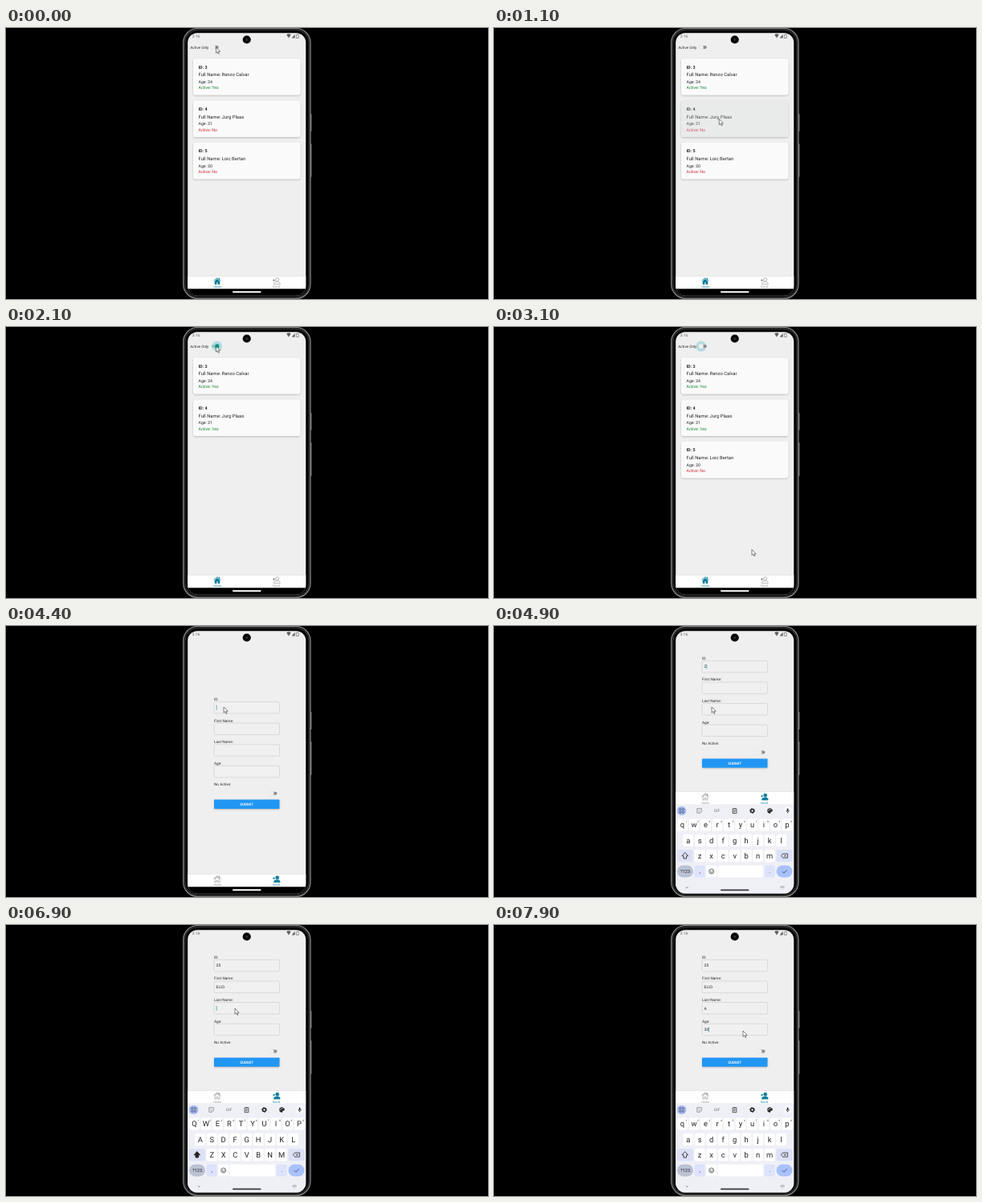
Recreate the animation shown at these times as an HTML page. Size 600x338 px, loop 8000 ms.

```html
<!DOCTYPE html>
<html lang="en">
<head>
<meta charset="utf-8">
<title>User list demo</title>
<style>
html, body { margin: 0; width: 100%; height: 100%; overflow: hidden; background: #000; }
svg { display: block; width: 100vw; height: 100vh; font-family: Roboto, "Noto Sans", sans-serif; text-rendering: geometricPrecision; }
</style>
</head>
<body>
<svg id="stage" viewBox="0 0 600 338"></svg>
<script>
const LOOP = 8000, STEP = 100;
const TEAL = '#0b7c9b', GREY = '#8a8a8a', INK = '#26262a', TRACK = '#8f8e90';
const stage = document.getElementById('stage');

// Markup helpers
const text = (x, y, size, str, attrs = '') =>
  `<text x="${x}" y="${y}" font-size="${size}" fill="${INK}" ${attrs}>${str}</text>`;
const rect = (x, y, w, h, r, fill, attrs = '') =>
  `<rect x="${x}" y="${y}" width="${w}" height="${h}" rx="${r}" fill="${fill}" ${attrs}/>`;
const circle = (x, y, r, fill, attrs = '') =>
  `<circle cx="${x}" cy="${y}" r="${r}" fill="${fill}" ${attrs}/>`;
const line = (d, color, width = .7, attrs = '') =>
  `<path d="${d}" fill="none" stroke="${color}" stroke-width="${width}" ${attrs}/>`;
const group = (id, body, attrs = '') => `<g id="${id}" ${attrs}>${body}</g>`;
const at = (x, y, body) => `<g transform="translate(${x} ${y})">${body}</g>`;
const MID = 'text-anchor="middle"';

const users = [
  { id: 3, name: 'Renzo Calvar', age: 34 },
  { id: 4, name: 'Jurg Plaas', age: 31 },
  { id: 5, name: 'Loic Bertan', age: 30 }
];

const card = (u, i) => group('card' + i,
  rect(0, 0, 133.4, 45.4, 3, '#fafafa', `id="face${i}" filter="url(#soft)"`) +
  group('info' + i,
    text(6.5, 12.4, 5.4, 'ID: ' + u.id, 'font-weight="700"') +
    text(6.5, 22, 5.85, 'Full Name: ' + u.name) +
    text(6.5, 30.9, 5.2, 'Age: ' + u.age) +
    text(6.5, 38.1, 5.2, '', `id="active${i}"`)),
  `transform="translate(233 ${38.2 + i * 52.3})"`);

const toggle = id => group(id,
  circle(-2.5, 0, 6.6, '#8fd3d8', 'class="ripple" opacity="0"') +
  rect(-4.5, -2, 9, 4, 2, TRACK, 'class="track"') +
  circle(-2.5, 0, 2.9, '#f2f1f2', 'class="thumb" stroke="#d5d5d5" stroke-width=".4"'));

const homePath = 'M-3 .2V4H-.9V1.4H.9V4H3V.2L0-2.4Z';
const personPath = 'M1-4A2 2 0 0 1 1 .2A2 2 0 0 1 1-4ZM-3.2 4V2.8C-3 1.4-1 1 1 1S4.2 1.6 4.4 2.8V4Z';
const tab = (id, x, d, label, detail) => at(x, 315.7, group(id,
  `<path d="${d}" stroke-width=".6" stroke-linejoin="round"/>` +
  `<path d="${detail}" fill="none" stroke-width=".9"/>` +
  text(0, 8.8, 3.6, label, MID)));

const labels = ['ID:', 'First Name:', 'Last Name:', 'Age:'];
const field = (label, i) => at(259, 93 + i * 26.6,
  text(0, 0, 4.7, label) +
  rect(0, 1.6, 81.5, 14.4, 1.6, '#f0f0f1', 'stroke="#cbcbcd" stroke-width=".6"') +
  text(2.6, 10.7, 5, '', `id="value${i}"`));

const wifi = '<path d="M349-2.2Q351.7-4.5 354.4-2.2L351.7 1.8Z"/><path d="M355.4 1.8H359.4V-2.8Z"/>' +
  '<path d="M361.2-2.2H362V-2.8H363.3V-2.2H364.1V1.8H361.2Z" fill="none" stroke-width=".6"/>';

// Keyboard
const rows = [['qwertyuiop', 234.5, 248], ['asdfghjkl', 241.7, 267.3], ['zxcvbnm', 256.2, 286.6]];
const key = (x, y, w, fill, r = 2) => rect(x - w / 2, y - 7.6, w, 15.2, r, fill);
const letters = rows.map(([chars, x0, y], r) => [...chars].map((c, i) => {
  const x = x0 + i * 14.5;
  const hint = r ? '' : text(x + 4.8, y - 3.2, 3.2, (i + 1) % 10, MID);
  return key(x, y, 12.8, '#fff') + hint +
    text(x, y + 3.3, 9.4, c, `${MID} class="letter"`);
}).join('')).join('');

const tools =
  circle(233.6, 230.5, 5.8, '#a9bdf3') +
  [-1.8, 1.8].map(dx => [-1.8, 1.8].map(dy =>
    circle(233.6 + dx, 230.5 + dy, 1.2, 'none', 'stroke="#3b4664" stroke-width=".7"')).join('')).join('') +
  at(255.6, 230.5, line('M-2.8-2.8H2.8V1L1 2.8H-2.8ZM-1.2.6Q0 1.8 1.2.6', '#777') + circle(-1, -.8, .4, '#777') + circle(1, -.8, .4, '#777')) +
  text(277.5, 232.4, 5, 'GIF', `${MID} style="fill:#777"`) +
  at(299.5, 230.5, line('M-2.4-2.6H2.4V3.2H-2.4ZM-1.2-2.4H1.2M-1.2 0H1.2M-1.2 1.4H.6', '#333', .8)) +
  at(321.5, 230.5, circle(0, 0, 2, 'none', 'stroke="#222" stroke-width="1.5"') +
    circle(0, 0, 3, 'none', 'stroke="#222" stroke-width=".9" stroke-dasharray="1.5 1.64"')) +
  at(343.5, 230.5, '<path d="M0-3.2A3.2 3.2 0 1 0 0 3.2C1.4 3.2 0 1.2 1.6 1.2 4.6 1.2 3.4-3.2 0-3.2Z" fill="#222"/>' +
    [[-1.7, 0], [-.8, -1.6], [1, -1.6]].map(p => circle(p[0], p[1], .6, '#fff')).join('')) +
  circle(365.6, 230.5, 5, '#fafbff') +
  at(365.6, 230.5, rect(-.9, -3, 1.8, 3.6, .9, '#222') + line('M-2-.4Q-1.8 1.6 0 1.6T2-.4M0 1.6V3', '#222'));

const keyboard = rect(226, 222.5, 148, 112, 0, '#eff0f6') + tools + letters +
  key(237.8, 286.6, 20, '#dce1f6') +
  `<path id="shift" d="M237.8 282.6 241.6 286.8H239.6V290H236V286.8H234Z" stroke="#222" stroke-width=".8" stroke-linejoin="round"/>` +
  key(361.5, 286.6, 20, '#dce1f6') +
  at(361.5, 286.6, line('M-4 0-2-2.6H4V2.6H-2ZM-.4-1.2 2 1.2M2-1.2-.4 1.2', '#333', .8)) +
  key(238, 306, 20, '#bac2d4', 7.6) + text(238, 308, 5.6, '?123', MID) +
  key(256.2, 306, 12.8, '#dce3fb') + text(256.2, 308, 7, ',', MID) +
  key(270.7, 306, 12.8, '#fff') +
  at(270.7, 306, circle(0, 0, 3, 'none', 'stroke="#333" stroke-width=".7"') +
    line('M-1.6.6Q0 2.6 1.6.6', '#333') + circle(-1.1, -.8, .5, '#333') + circle(1.1, -.8, .5, '#333')) +
  key(306.5, 306, 56.5, '#fff') +
  key(343.2, 306, 12.8, '#dce3fb') + text(343.2, 308, 7, '.', MID) +
  key(361.5, 306, 20, '#a9c1fb', 7.6) + line('M358.8 306.2 360.8 308.2 364.6 304.2', '#2b3d6b', .8) +
  line('M238.8 325.4 240.2 326.8 241.6 325.4', '#555') +
  at(359, 325.5, rect(-2.6, -1.6, 5.2, 3, .5, '#c4c6cc') + line('M-.9 2.4 0 3.2 .9 2.4', '#aaa', .5)) +
  rect(282, 328.5, 35.5, 1.7, .8, '#3a3a3c');

const phone =
  rect(378, 107, 2.4, 22, 1, '#7a7a7a') + rect(378, 144, 2.4, 42, 1, '#7a7a7a') +
  rect(220.7, .5, 158.3, 337, 18, '#1c1c1c', 'stroke="#8a8a8a" stroke-width="1.2"') +
  rect(222.6, 2.4, 154.5, 333.2, 16.2, '#050505', 'stroke="#3c3c3c" stroke-width=".9"');

stage.innerHTML = `<defs>
  <clipPath id="screen"><rect x="226.2" y="6.2" width="147" height="327.6" rx="12"/></clipPath>
  <filter id="soft" x="-10%" y="-20%" width="120%" height="150%">
    <feDropShadow dx="0" dy=".9" stdDeviation=".9" flood-color="#000" flood-opacity=".24"/></filter>
  <filter id="deep" x="-10%" y="-20%" width="120%" height="160%">
    <feDropShadow dx="0" dy="3" stdDeviation="3" flood-color="#000" flood-opacity=".45"/></filter>
</defs>` +
  rect(0, 0, 600, 338, 0, '#000') + phone +
  `<g clip-path="url(#screen)">` +
  rect(226, 6, 148, 328, 0, '#f0eff0') +
  group('listPage', text(229.3, 25.8, 4.65, 'Active Only') + at(260.3, 24, toggle('filter')) + users.map(card).join('')) +
  group('formPage', labels.map(field).join('') +
    text(259, 199.4, 4.7, 'No Active:') + at(333, 208.7, toggle('status')) +
    rect(259, 216.6, 81.5, 11.4, .8, '#2196f3', 'filter="url(#soft)"') +
    text(299.7, 223.9, 4.6, 'SUBMIT', `${MID} font-weight="500" style="fill:#fff"`) +
    rect(0, 0, .6, 6, 0, '#009688', 'id="caret"')) +
  group('tabs', rect(226, 309.4, 148, 16, 0, '#fff') + rect(226, 309, 148, .5, 0, '#d6d6d8') +
    tab('home', 263, homePath, 'Home', 'M-4.4-.3 0-4 4.4-.3M2.5-1.8V-3.9') +
    tab('enroll', 336.7, personPath, 'Enroll', 'M-4.6-1H-1.8M-3.2-2.4V.4')) +
  rect(226, 325.3, 148, 9, 0, '#000') + rect(282, 328.3, 35.5, 1.9, .9, '#fff') +
  group('keys', keyboard) +
  group('dialog',
    rect(226, 6, 148, 319.3, 0, '#000', 'opacity=".6"') +
    rect(234.8, 144.1, 129.4, 51.4, .8, '#fff', 'filter="url(#deep)"') +
    text(243, 157.2, 6.5, 'Success', 'font-weight="500"') +
    text(243, 167.1, 5.26, 'User status updated successfully') +
    text(350, 189.2, 4.7, 'OK', `${MID} font-weight="500"`)) +
  group('bar', text(231.8, 12.1, 4.9, '3:16', 'style="fill:inherit"') + at(.2, 10.7, wifi)) +
  `</g>` +
  circle(299.7, 14.5, 5.1, '#060606') + circle(299.7, 14.5, 1.5, '#2a2f3c') +
  group('cursor', '<path d="M0 0V7.2L1.7 5.7 2.9 8.3 4 7.8 2.9 5.3H5.1Z" fill="#fff" stroke="#333" stroke-width=".6" stroke-linejoin="round"/>');

const el = id => document.getElementById(id);
const set = (node, attrs) => Object.entries(attrs).forEach(([k, v]) => node.setAttribute(k, v));
const show = (id, on) => set(el(id), { display: on ? 'inline' : 'none' });
const clamp = v => Math.max(0, Math.min(1, v));
const ramp = (t, from, to) => clamp((t - from) / (to - from));
const ease = p => p * p * (3 - 2 * p);
const within = (t, from, to) => t >= from && t < to;

// [time, x, y] of the pointer tip
const path = [
  [0, 261.5, 24], [700, 261.5, 24], [1000, 280.3, 113.5], [1200, 280.3, 113.5],
  [1500, 349, 184.3], [1700, 349, 184.3], [2000, 261.5, 24], [2800, 261.5, 24],
  [3100, 321, 277.5], [3400, 336, 315], [3800, 336, 315], [4200, 271, 101],
  [5000, 271, 101], [5250, 280.3, 78], [6600, 280.3, 78], [6850, 285, 104],
  [7350, 285, 104], [7500, 310, 132], [8000, 310, 132]
];

// [time, field, value]: focus and typing
const typing = [
  [4300, 0, ''], [4900, 0, '2'], [5100, 0, '20'],
  [5300, 1, ''], [5900, 1, 'E'], [6000, 1, 'EL'], [6200, 1, 'ELI'], [6300, 1, 'ELIO'],
  [6900, 2, ''], [7300, 2, 'A'],
  [7500, 3, ''], [7700, 3, '3'], [7800, 3, '30']
];

const clicks = [200, 600, 2100, 2900];

function pointer(t) {
  const i = Math.max(1, path.findIndex(p => p[0] > t));
  const [a, b] = [path[i - 1], path[i]];
  const p = ease(ramp(t, a[0], b[0]));
  set(el('cursor'), { transform: `translate(${a[1] + (b[1] - a[1]) * p} ${a[2] + (b[2] - a[2]) * p})` });
}

function drawList(t) {
  const filtered = within(t, 200, 600) || within(t, 2100, 2900);
  const pressed = within(t, 1050, 1250);
  const active = [true, t >= 1250, false];
  users.forEach((u, i) => {
    show('card' + i, !filtered || active[i]);
    const hit = pressed && i === 1;
    set(el('face' + i), { fill: hit ? '#e9eaea' : '#fafafa' });
    set(el('info' + i), { opacity: hit ? .75 : 1 });
    el('active' + i).textContent = 'Active: ' + (active[i] ? 'Yes' : 'No');
    set(el('active' + i), { fill: active[i] ? '#168336' : '#cf2430' });
  });
  const part = name => el('filter').querySelector('.' + name);
  const x = filtered ? 2.5 : -2.5;
  const last = clicks.filter(c => c <= t).pop();
  const age = last === undefined ? LOOP : t - last;
  set(part('thumb'), { cx: x, fill: filtered ? '#009688' : '#f2f1f2' });
  set(part('track'), { fill: filtered ? '#8cc9c3' : TRACK });
  set(part('ripple'), { cx: x, opacity: age < 400 ? .6 * (1 - ramp(age, 200, 400)) : 0 });
}

function drawForm(t, lift) {
  const values = ['', '', '', ''];
  let now = null;
  for (const e of typing) if (e[0] <= t) { now = e; values[e[1]] = e[2]; }
  values.forEach((v, i) => { el('value' + i).textContent = v; });
  set(el('formPage'), { transform: `translate(0 ${-51.2 * lift})` });
  show('caret', now && (t - now[0]) % 1000 < 500);
  if (now) set(el('caret'), {
    x: 261.8 + (now[2] ? el('value' + now[1]).getComputedTextLength() : 0),
    y: 98.8 + now[1] * 26.6
  });
  const upper = !now || now[2] === '';
  stage.querySelectorAll('.letter').forEach(n => {
    n.textContent = upper ? n.textContent.toUpperCase() : n.textContent.toLowerCase();
  });
  set(el('shift'), { fill: upper ? '#222' : 'none' });
}

function paintTab(id, on) {
  const color = on ? TEAL : GREY;
  set(el(id), { stroke: color, fill: on ? color : 'none' });
  set(el(id).querySelector('text'), { fill: color, stroke: 'none' });
}

function draw(time) {
  const t = Math.floor((time % LOOP) / STEP) * STEP;
  const onForm = t >= 3700;
  const slide = ease(ramp(t, 4400, 4700));
  const dim = ramp(t, 1200, 1400) * (1 - ramp(t, 1600, 1800));
  show('listPage', !onForm);
  show('formPage', onForm);
  if (onForm) drawForm(t, slide); else drawList(t);
  paintTab('home', !onForm);
  paintTab('enroll', onForm);
  set(el('tabs'), { transform: `translate(0 ${-102.6 * slide})` });
  show('keys', slide > 0);
  set(el('keys'), { transform: `translate(0 ${112 * (1 - slide)})` });
  show('dialog', dim > 0);
  set(el('dialog'), { opacity: dim });
  const tint = dim > .5 ? '#fff' : '#606064';
  set(el('bar'), { fill: tint, stroke: 'none' });
  set(el('bar').querySelector('path:last-child'), { stroke: tint });
  pointer(t);
}

const start = performance.now();
function tick() {
  draw(performance.now() - start);
  requestAnimationFrame(tick);
}
tick();
</script>
</body>
</html>
```
